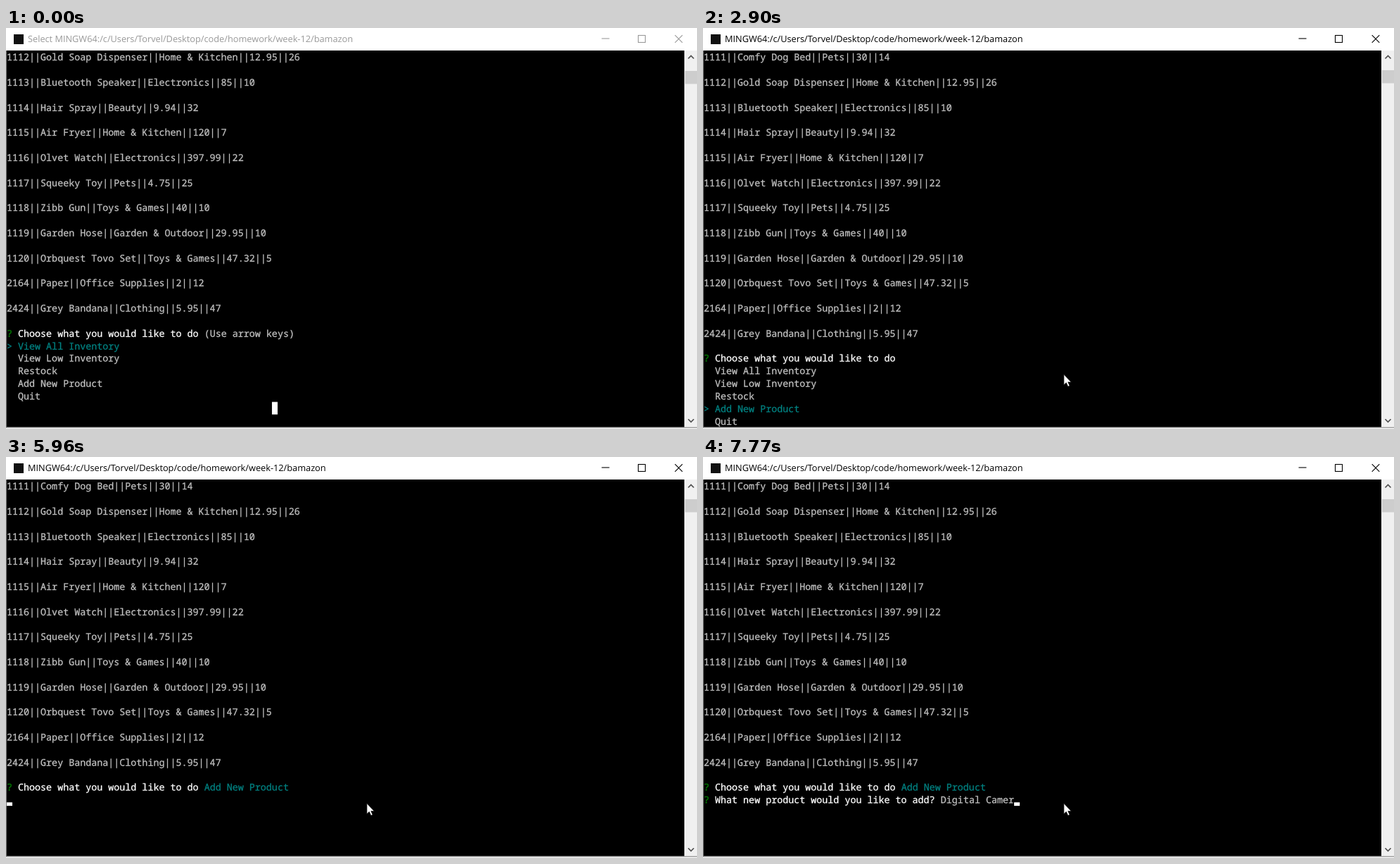
These frames come from a looping animation (982 by 570 pixels, 8000 ms). An HTML page:

```html
<!DOCTYPE html>
<html lang="en">
<head>
<meta charset="utf-8">
<title>Inventory console</title>
<style>
html, body { margin: 0; width: 100%; height: 100%; overflow: hidden; background: #fff; }
svg { display: block; }
text { white-space: pre; text-rendering: geometricPrecision; }
#title { font: 12.75px "Open Sans", sans-serif; }
#screen { font: 13.367px "Noto Sans Mono", monospace; stroke-width: .3; }
.line { fill: none; stroke: #000; stroke-width: 1.1; }
.arrow { fill: none; stroke: #505050; stroke-width: 1.7; }
</style>
</head>
<body>
<svg width="982" height="570" viewBox="0 0 982 570">
  <rect width="982" height="570" fill="#fff"/>
  <rect x="11" y="9" width="14" height="14" fill="#111"/>
  <text id="title" x="31" y="20.4"></text>
  <g id="buttons" class="line">
    <path d="M846.5 15H857.5"/>
    <rect x="898.5" y="10.5" width="10" height="10"/>
    <path d="M950.7 10.2L961.3 20.8M961.3 10.2L950.7 20.8"/>
  </g>
  <rect y="32" width="964" height="535.4" fill="#000"/>
  <rect y="32" width="1" height="536" fill="#707070"/>
  <rect x="964" y="32" width="18" height="535.4" fill="#f0f0f0"/>
  <rect id="thumb" x="965" width="17" height="18.5" fill="#cdcdcd"/>
  <path class="arrow" d="M969.5 43.5L973.5 39.5L977.5 43.5M969.5 556L973.5 560L977.5 556"/>
  <rect y="567.4" width="982" height="1.2" fill="#858585"/>
  <g id="screen"></g>
  <rect id="caret" fill="#fff"/>
  <path id="mouse" d="M0 0V15.2L3.4 12L5.9 17.4L8.4 16.3L6 11.1H10.6Z" fill="#fff" stroke="#000" stroke-width=".8"/>
</svg>
<script>
const LOOP = 8000, TOP = 32, LEFT = 1, COL = 8.02, ROW = 17.84;
const GREY = '#c0c0c0', WHITE = '#fff', TEAL = '#008080', GREEN = '#008000';
const PATH = 'MINGW64:/c/Users/Torvel/Desktop/code/homework/week-12/bamazon';
const ITEMS = [
  '1111||Comfy Dog Bed||Pets||30||14',
  '1112||Gold Soap Dispenser||Home & Kitchen||12.95||26',
  '1113||Bluetooth Speaker||Electronics||85||10',
  '1114||Hair Spray||Beauty||9.94||32',
  '1115||Air Fryer||Home & Kitchen||120||7',
  '1116||Olvet Watch||Electronics||397.99||22',
  '1117||Squeeky Toy||Pets||4.75||25',
  '1118||Zibb Gun||Toys & Games||40||10',
  '1119||Garden Hose||Garden & Outdoor||29.95||10',
  '1120||Orbquest Tovo Set||Toys & Games||47.32||5',
  '2164||Paper||Office Supplies||2||12',
  '2424||Grey Bandana||Clothing||5.95||47'
];
const MENU = ['View All Inventory', 'View Low Inventory', 'Restock', 'Add New Product', 'Quit'];
const CHOOSE = 'Choose what you would like to do ';
const ASK = 'What new product would you like to add? ';
const ANSWER = 'Digital Camera';

// [time, selected menu entry]; -1 is a cleared menu, 9 the answered prompt
const PICKS = [[0, 0], [1910, 1], [2440, 2], [2900, 3], [4240, -1], [4270, 9]];
// [time, letters typed]; -1 is the moment the prompt line is wiped
const KEYS = [
  [0, 0], [5660, 1], [5960, -1], [5990, 2], [6120, -1], [6150, 3], [6290, -1], [6320, 4],
  [6550, -1], [6580, 5], [6690, -1], [6720, 6], [6820, -1], [6850, 7], [6950, -1], [6980, 8],
  [7140, -1], [7170, 9], [7300, -1], [7330, 10], [7460, 11], [7610, 12], [7740, -1], [7770, 13]
];
const BLINK = [[0, 1], [4530, 0], [5020, 1], [5510, 0], [5660, 1]];
const ACTIVE = 880, SCROLL = 1910, MOVE_FROM = 330, MOVE_TO = 690;

const $ = id => document.getElementById(id);
const at = (steps, t) => steps.reduce((v, s) => t >= s[0] ? s[1] : v, steps[0][1]);
const set = (el, attrs) => { for (const k in attrs) el.setAttribute(k, attrs[k]); };

function put(row, col, str, color) {
  const el = document.createElementNS('http://www.w3.org/2000/svg', 'text');
  set(el, { x: LEFT + col * COL, y: TOP + row * ROW + 14.2, fill: color, stroke: color });
  el.textContent = str;
  $('screen').append(el);
}

function prompt(row, str) {
  put(row, 0, '?', GREEN);
  put(row, 2, str, WHITE);
}

function caret(row, col, height) {
  set($('caret'), {
    x: LEFT + col * COL, y: TOP + (row + 1) * ROW - height,
    width: height ? COL : 0, height
  });
}

function drawScreen(scrolled, pick, typed, blink) {
  $('screen').replaceChildren();
  const items = scrolled ? ITEMS : ITEMS.slice(1);
  items.forEach((s, i) => put(i * 2, 0, s, GREY));
  const row = items.length * 2;
  const after = 2 + CHOOSE.length;
  caret(0, 0, 0);
  if (pick >= 0) prompt(row, CHOOSE);
  if (pick === 9) {
    put(row, after, MENU[3], TEAL);
    if (typed >= 0) {
      const col = 2 + ASK.length;
      prompt(row + 1, ASK);
      put(row + 1, col, ANSWER.slice(0, typed), GREY);
      caret(row + 1, col + typed, blink ? 5 : 0);
    } else caret(row + 1, 0, 5);
  } else if (pick >= 0) {
    MENU.forEach((s, i) => {
      if (i === pick) put(row + 1 + i, 0, '>', TEAL);
      put(row + 1 + i, 2, s, i === pick ? TEAL : GREY);
    });
    if (!scrolled) {
      put(row, after, '(Use arrow keys)', GREY);
      caret(28, 47, ROW);
    }
  }
}

let last = '';
function render(t) {
  const active = t >= ACTIVE, scrolled = t >= SCROLL;
  const state = [scrolled, at(PICKS, t), at(KEYS, t), at(BLINK, t)];
  const key = state.join() + active;
  if (key !== last) {
    last = key;
    drawScreen(...state);
    $('title').textContent = (scrolled ? '' : 'Select ') + PATH;
    set($('title'), { fill: active ? '#000' : '#999' });
    $('buttons').style.stroke = active ? '#000' : '#999';
    set($('thumb'), { y: scrolled ? 60 : 61 });
  }
  const p = Math.min(1, Math.max(0, (t - MOVE_FROM) / (MOVE_TO - MOVE_FROM)));
  const left = (1 - p) ** 2;
  set($('mouse'), {
    transform: `translate(${512.8 + 190 * left} ${492.3 + 76 * left})`,
    visibility: t < MOVE_FROM ? 'hidden' : 'visible'
  });
}

const start = performance.now();
function tick() {
  render((performance.now() - start) % LOOP);
  requestAnimationFrame(tick);
}
tick();
</script>
</body>
</html>
```
